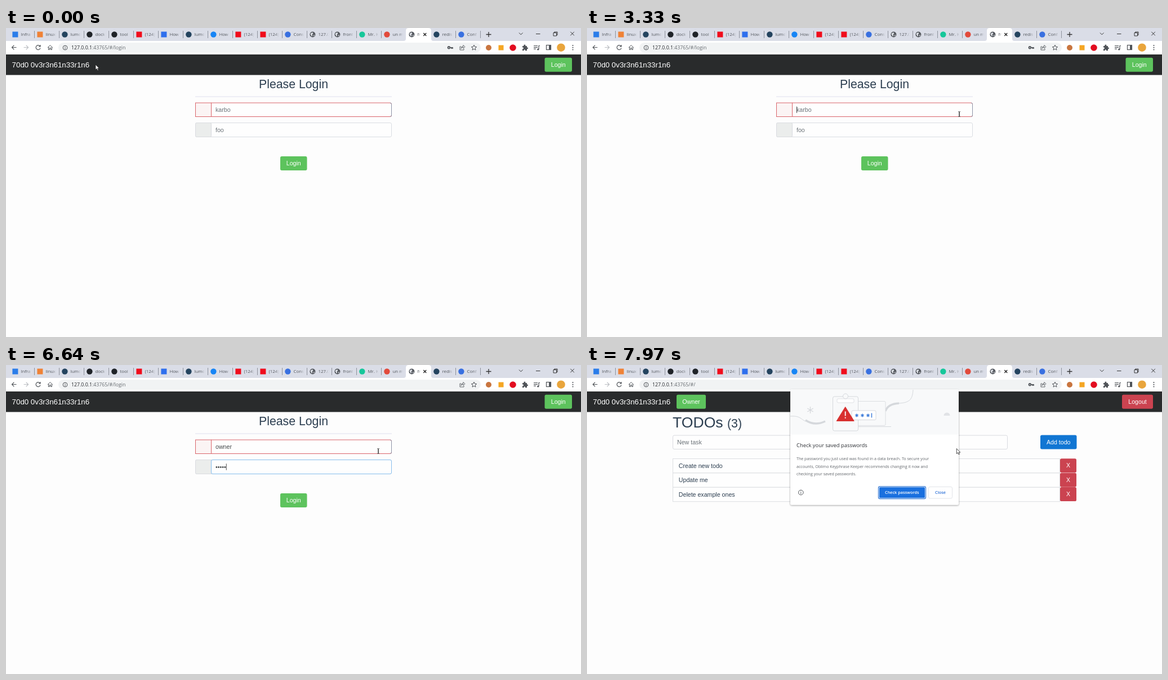
An HTML page for the animation above (8000 ms loop, 1021x549 px).

```html
<!DOCTYPE html>
<html lang="en">
<head>
<meta charset="utf-8">
<title>Todo login</title>
<style>
  html, body { margin: 0; width: 100%; height: 100%; overflow: hidden; background: #fdfdfd; }
  svg { display: block; width: 100vw; height: 100vh; }
  text { font: 10.64px "Liberation Sans", Arial, sans-serif; fill: #2c3e50; white-space: pre; }
  .ui { font-family: "Open Sans", "Noto Sans", sans-serif; fill: #54585e; }
  .mid { text-anchor: middle; }
  .line { fill: none; stroke: #4f5358; stroke-width: 1; }
  .hint { fill: #6b7278; }
  .typed { fill: #464a4c; }
</style>
</head>
<body>
<svg id="stage" viewBox="0 0 1021 549" preserveAspectRatio="none"></svg>
<script>
const LOOP = 8000, CLICK = 3100, TAB = 5300, SUBMIT = 7400, TODOS = 7730, POPUP = 7870;
const GREEN = '#5dc35d', RED = '#cb4350', BLUE = '#1176d3';

// Drawing helpers
const rect = (x, y, w, h, fill, extra = '') =>
  `<rect x="${x}" y="${y}" width="${w}" height="${h}" fill="${fill}" ${extra}/>`;
const circle = (x, y, r, fill, extra = '') => `<circle cx="${x}" cy="${y}" r="${r}" fill="${fill}" ${extra}/>`;
const path = (d, extra = '') => `<path class="line" d="${d}" ${extra}/>`;
const text = (x, y, s, cls = '', style = '') => `<text x="${x}" y="${y}" class="${cls}" style="${style}">${s}</text>`;
const button = (x, y, w, label, fill) =>
  rect(x, y, w, 25, fill, 'rx="2.7"') + text(x + w / 2, y + 16, label, 'mid', 'fill:#fff');
const box = (x, y, w, h, stroke, fill = '#fefefe') =>
  rect(x + .5, y + .5, w - 1, h - 1, fill, `stroke="${stroke}" rx="2.5"`);
// A group visible only in the given "from-to" spans (ms)
const during = (spans, body, extra = '') => `<g data-spans="${spans}" ${extra}>${body}</g>`;

const globe = (x, y) => circle(x, y, 5, '#565a60') +
  `<path d="M${x - 4} ${y - 1}q2-3 4-2.5l1 2-2 1.5 1 2-1.5 1.5zM${x + 1.5} ${y + 1}h2.5l-2 2.5z" fill="#dfe2e8"/>`;

const TABS = [
  ['Infra', '#2b7de9', 1], ['linux', '#ef8236', 1], ['lumo', '#24445f'], ['dock', '#1f2328'], ['tool', '#1f2328'],
  ['(124)', '#f00d1c', 1], ['How', '#2f6fed', 1], ['lumo', '#24445f'], ['How', '#1785f5'], ['(124)', '#f00d1c', 1],
  ['(124)', '#f00d1c', 1], ['Cons', '#3970e0'], ['127.0', 'globe'], ['front', 'globe'], ['Mr. K', '#16c79a'],
  ['un m', '#e24a3b'], ['fr', 'globe'], ['redis', '#24445f'], ['Conf', '#3970e0']
];
const ACTIVE = 16;

function tab([title, color, square], i) {
  const x = 16.4 + 44 * i, active = i === ACTIVE;
  const icon = color === 'globe' ? globe(x, 11.5)
    : square ? rect(x - 5, 6.5, 10, 10, color) : circle(x, 11.5, 5.2, color);
  const w = active ? 7 : 18;
  let out = active
    ? `<path d="M706 23q4 0 4-4V5q0-5 5-5h35q5 0 5 5v14q0 4 4 4z" fill="#fff"/>` : '';
  out += icon + `<svg x="${x + 10}" y="0" width="${w}" height="22">${text(0, 14, title, 'ui', 'font-size:7.9px')}</svg>`;
  out += rect(x + 10 + w - 6, 4, 6.5, 14, `url(#fade${active ? 'Active' : ''})`);
  if (active) out += path('M741.3 9l5 5m0-5l-5 5', 'style="stroke:#222;stroke-width:1.3"');
  else if (i !== ACTIVE - 1) out += rect(x + 33.6, 5, 1, 13, '#8e929c');
  return out;
}

function chrome() {
  const fade = (id, c) => `<linearGradient id="${id}"><stop stop-color="${c}" stop-opacity="0"/><stop offset="1" stop-color="${c}"/></linearGradient>`;
  return `<defs>${fade('fade', '#dadde7')}${fade('fadeActive', '#fff')}
    <filter id="shadow" x="-10%" y="-10%" width="120%" height="125%"><feDropShadow dx="0" dy="1" stdDeviation="1.7" flood-opacity=".4"/></filter></defs>` +
    rect(0, 0, 1021, 23, '#dadde7') + rect(0, 23, 1021, 24, '#fff') + TABS.map(tab).join('') +
    // Window controls
    path('M852.5 11.5h9m-4.5-4.5v9', 'style="stroke:#333;stroke-width:1.3"') +
    path('M911 8.5l3.3 3.3 3.3-3.3M941 10.5h7.5M972 8.5h5.5v5.5h-5.5zM973.5 8.5v-1.5h5.5v5.5h-1.5M1002.3 6.8l6.5 6.5m0-6.5l-6.5 6.5', 'style="stroke:#333"') +
    // Navigation
    path('M18.5 34.5h-8m3.8-3.8l-3.8 3.8 3.8 3.8', 'style="stroke-width:1.2"') +
    path('M31.5 34.5h8m-3.8-3.8l3.8 3.8-3.8 3.8', 'style="stroke:#b9bcc1;stroke-width:1.2"') +
    path('M60.5 32.4a4 4 0 1 0 .5 3.2M61 30v3h-3', 'style="stroke-width:1.2"') +
    path('M74 34.8l4.3-4.2 4.3 4.2M75.4 33.8v4.7h2v-3h2v3h2v-4.7') +
    rect(93, 26, 750, 17.5, '#f1f3f4', 'rx="8.7"') +
    circle(105, 35, 3.9, 'none', 'class="line"') + path('M105 34.2v3.2M105 32.3v1') +
    `<text x="116" y="38.2" class="ui" style="font-size:8.75px;fill:#25282c">127.0.0.1<tspan id="route" fill="#666b70"></tspan></text>` +
    during('0-4040 7400-8000', circle(786.4, 34.8, 1.8, 'none', 'stroke="#4f5358" stroke-width="1.8"') +
      path('M788 34.8h5v2.2m-2-2v2', 'style="stroke-width:1.6"')) +
    path('M808 33h-2v6h7v-2M807.8 36.5q.4-4 4.2-4v-2l3 3-3 2.8v-2q-2.5 0-4.2 2.2z', 'style="stroke-width:.9"') +
    path('M831 30.2l1.4 3.1 3.3.3-2.5 2.2.8 3.3-3-1.8-3 1.8.8-3.3-2.5-2.2 3.3-.3z') +
    circle(857, 35, 5, '#c9753f') + rect(874.5, 30.5, 9, 9, '#f5a623') + circle(900, 35, 5.8, '#e30d20') +
    `<path d="M917 32h2.5q-.7-2.4 1.4-2.4T922.300 32H925v2.700q2-.5 2 1.200t-2 1.300v3H922q.2-2-1.300-2t-1.200 2H917v-3q2 .2 2-1.400t-2-1.200z" fill="#4f5358"/>` +
    path('M937 31.500h7m-7 2.800h7m-7 2.800h4M946 38v-6.500h2', 'style="stroke-width:1.2"') + circle(944.7, 38, 1.6, '#4f5358') +
    rect(959.5, 30.5, 8, 8, 'none', 'class="line" style="stroke-width:1.2"') + rect(964, 30.5, 3.5, 8, '#4f5358') +
    circle(985.5, 34.700, 7.300, '#e9a53c') +
    [31, 34.700, 38.400].map(y => circle(1006.500, y, 1, '#44484d')).join('');
}

function loginPage() {
  const field1 = rect(336.5, 133, 28, 24.5, '#fbf4f4', 'stroke="#d9646a"') +
    `<path d="M364.500 133h317.500q2.500 0 2.500 2.500v19.500q0 2.500-2.500 2.500H364.500z" fill="#fefefe" stroke="#d9646a"/>` +
    path('M682 133q2.500 0 2.500 2.500v19.500q0 2.500-2.500 2.500', 'style="stroke:#8b93a6"');
  const field2 = box(336, 168, 349, 26, '#dadde2') + rect(336.5, 168.5, 28, 25, '#ebedec', 'rx="2" stroke="#d9dbe0"') +
    during(`${TAB}-${LOOP}`, box(364, 168, 321, 26, '#86bdec'));
  return text(510.500, 106.500, 'Please Login', 'mid', 'font-size:21.28px') +
    rect(336, 121.500, 349, 1, '#dfe0ee') + field1 + field2 +
    during('0-4040', text(372, 149, 'karbo', 'hint')) + text(372, 149, '', 'typed user') +
    during('0-6000', text(372, 184.700, 'foo', 'hint')) + text(372, 184.700, '', 'typed pass') +
    button(487, 228, 47.500, 'Login', GREEN) + rect(0, 0, .8, 11.500, '#222', 'id="caret"');
}

function todoPage() {
  const row = (label, i) => {
    const y = 166 + 25.400 * i;
    return rect(152.500, y + .5, 687, 25.400, '#fefefe', 'stroke="#dcdee2"') + text(162.800, y + 16.800, label) +
      button(840, y + .3, 29, 'X', RED);
  };
  return text(152, 111, `TODOs <tspan style="font-size:21.280px">(3)</tspan>`, '', 'font-size:26.600px') +
    box(152, 124.500, 595, 25.500, '#d9dbe0') + text(160, 141, 'New task', 'hint') +
    button(805, 124.500, 64.500, 'Add todo', BLUE) +
    ['Create new todo', 'Update me', 'Delete example ones'].map(row).join('');
}

function popup() {
  const body = ['The password you just used was found in a data breach. To secure your',
    'accounts, Oblimo Keyphrase Keeper recommends changing it now and', 'checking your saved passwords.'];
  const gray = 'style="stroke:#d5d8dc;stroke-width:';
  const star = (x, y, r) => [0, 60, 120].map(a => {
    const dx = r * Math.sin(a * Math.PI / 180), dy = r * Math.cos(a * Math.PI / 180);
    return `M${x - dx} ${y - dy}L${x + dx} ${y + dy}`;
  }).join('');
  return rect(361, 43.500, 299, 205, '#fff', 'rx="2.500" filter="url(#shadow)"') +
    rect(361, 43.500, 299, 80, '#f8f9fa', 'rx="2.500"') +
    path('M361 91c18-1 18 5 27 9', gray + '1"') + path('M388 98q16 11 35 2', gray + '3.500"') +
    path('M530 82q4-13 24-14', gray + '3.500"') + path('M554 68c20-1 24-8 25-24', gray + '1"') +
    path(star(396.500, 80, 6), gray + '1.300"') + `<path d="M633.500 90a5.500 5.500 0 0 1 11 0z" fill="#e1e3e6"/>` +
    rect(474, 64.500, 56, 43, '#f8f9fa', 'stroke="#dcdee2" rx="2"') + path('M474 109.500h66', gray + '1"') +
    rect(436.500, 56, 45, 61, '#f8f9fa', 'stroke="#d5d8dc" rx="3"') +
    rect(444, 60, 30, 7, '#fff', 'stroke="#dfe1e5" rx="2"') + circle(459, 55.500, 4.500, '#f8f9fa', 'stroke="#d5d8dc"') +
    rect(470, 81, 43, 16.500, '#fff', 'stroke="#d5d8dc" rx="2"') +
    path([479, 489, 499].map(x => star(x, 89.500, 3)).join('') + 'M505.500 85.500v8', 'style="stroke:#2a6fd6;stroke-width:1.300"') +
    `<path d="M458.700 74.500l15.500 25h-31z" fill="#d8302f" stroke="#d8302f" stroke-linejoin="round"/>` +
    path('M458.700 82.500v8M458.700 92.800v2', 'style="stroke:#fff;stroke-width:1.800"') +
    text(372, 146, 'Check your saved passwords', 'ui', 'font-size:9.400px;fill:#2b2e33') +
    body.map((s, i) => text(372, 169.300 + 13.300 * i, s, 'ui', 'font-size:7.100px;fill:#63676c')).join('') +
    circle(379.800, 226.500, 4.300, 'none', 'class="line"') + path('M379.800 226v3M379.800 223.800v1.100') +
    rect(517.500, 215.800, 84, 21.700, '#fff', 'stroke="#3579d4" stroke-width="1.300" rx="2.500"') +
    rect(519, 217.300, 81, 18.700, '#1a70df', 'rx="1.500"') +
    text(559.300, 229.300, 'Check passwords', 'ui mid', 'font-size:7.300px;font-weight:600;fill:#fff') +
    rect(606.500, 216.500, 42, 20.500, '#fff', 'stroke="#e2e4e8" rx="2.500"') +
    text(627.500, 229.300, 'Close', 'ui mid', 'font-size:7.300px;font-weight:600;fill:#2a6fd6');
}

const stage = document.getElementById('stage');
stage.innerHTML = rect(0, 0, 1021, 549, '#fdfdfd') + chrome() + rect(0, 47, 1021, 36.500, '#292b2c') +
  text(10.600, 69.800, '70d0 0v3r3n61n33r1n6', '', 'font-size:13.300px;fill:#fff') +
  during(`0-${TODOS}`, button(956.500, 52.700, 48.500, 'Login', GREEN) + `<g id="form">${loginPage()}</g>`) +
  during(`${SUBMIT}-${TODOS}`, `<path id="spinner" fill="none" stroke="#3b7df0" stroke-width="4"/>` +
    text(510.500, 198, 'Logging in...', 'mid')) +
  during(`${TODOS}-${LOOP}`, button(159, 52.700, 52, 'Owner', GREEN) + button(950, 52.700, 55, 'Logout', RED) + todoPage()) +
  during(`${POPUP}-${LOOP}`, popup()) +
  `<g id="pointer">${during(`0-2780 ${SUBMIT}-${LOOP}`,
    `<path d="M0 0V9.200L2.100 7.200 3.700 10.500 5.200 9.800 3.700 6.700H6.500Z" fill="#fff" stroke="#222" stroke-width=".8"/>`)}
   ${during(`2780-${SUBMIT}`, path('M3-0q1.800 0 1.800 1v7q0 1-1.800 1M6.600 0q-1.800 0-1.800 1v7q0 1 1.800 1', 'style="stroke:#222;stroke-width:.9"'))}</g>`;

const $ = s => stage.querySelector(s);
const parts = {
  route: $('#route'), form: $('#form'), user: $('.user'), pass: $('.pass'),
  caret: $('#caret'), spinner: $('#spinner'), pointer: $('#pointer')
};
const timed = [...stage.querySelectorAll('[data-spans]')].map(el =>
  ({ el, spans: el.dataset.spans.split(' ').map(s => s.split('-').map(Number)) }));

const USER = 'owner', USER_KEYS = [4040, 4200, 4400, 4530, 4670];
const PASS_KEYS = [6000, 6170, 6360, 6500, 6640];
const POINTER = [[0, 159, 65], [500, 159, 65], [1100, 142, 192], [1600, 142, 192],
  [2200, 430, 238], [2600, 610, 185], [2950, 656.300, 148.500], [LOOP, 656.300, 148.500]];

function pointerAt(t) {
  const i = POINTER.findIndex(p => p[0] > t);
  const [t0, x0, y0] = POINTER[i - 1], [t1, x1, y1] = POINTER[i];
  const u = (t - t0) / (t1 - t0), e = u * u * (3 - 2 * u);
  return [x0 + (x1 - x0) * e, y0 + (y1 - y0) * e];
}

function render(t) {
  for (const { el, spans } of timed)
    el.style.display = spans.some(([a, b]) => t >= a && t < b) ? '' : 'none';

  const pressed = keys => keys.filter(k => k <= t).length;
  parts.user.textContent = USER.slice(0, pressed(USER_KEYS));
  parts.pass.textContent = '•'.repeat(pressed(PASS_KEYS));
  parts.route.textContent = t < SUBMIT ? ':43765/#/login' : ':43765/#/';
  parts.form.setAttribute('opacity', t < SUBMIT ? 1 : .3);
  parts.pointer.setAttribute('transform', `translate(${pointerAt(t)})`);

  const lastInput = Math.max(...[CLICK, ...USER_KEYS, TAB, ...PASS_KEYS].filter(k => k <= t), -1);
  const shown = lastInput > 0 && t < SUBMIT && (t - lastInput) % 1000 < 500;
  parts.caret.style.display = shown ? '' : 'none';
  if (shown) {
    const field = t < TAB ? parts.user : parts.pass;
    const width = field.textContent ? field.getComputedTextLength() : 0;
    parts.caret.setAttribute('x', 372.200 + width);
    parts.caret.setAttribute('y', t < TAB ? 139.500 : 175.300);
  }

  // Arc that lengthens while it turns
  const age = Math.max(0, t - SUBMIT);
  const head = (age - 100) * .006 + .13, tail = head - .26 - Math.max(0, age - 100) * .003;
  const at = a => `${510.500 + 18.500 * Math.cos(a)} ${165 + 18.500 * Math.sin(a)}`;
  parts.spinner.setAttribute('d', `M${at(tail)}A18.500 18.500 0 0 1 ${at(head)}`);
}

const start = performance.now();
function tick() {
  render((performance.now() - start) % LOOP);
  requestAnimationFrame(tick);
}
tick();
</script>
</body>
</html>
```
